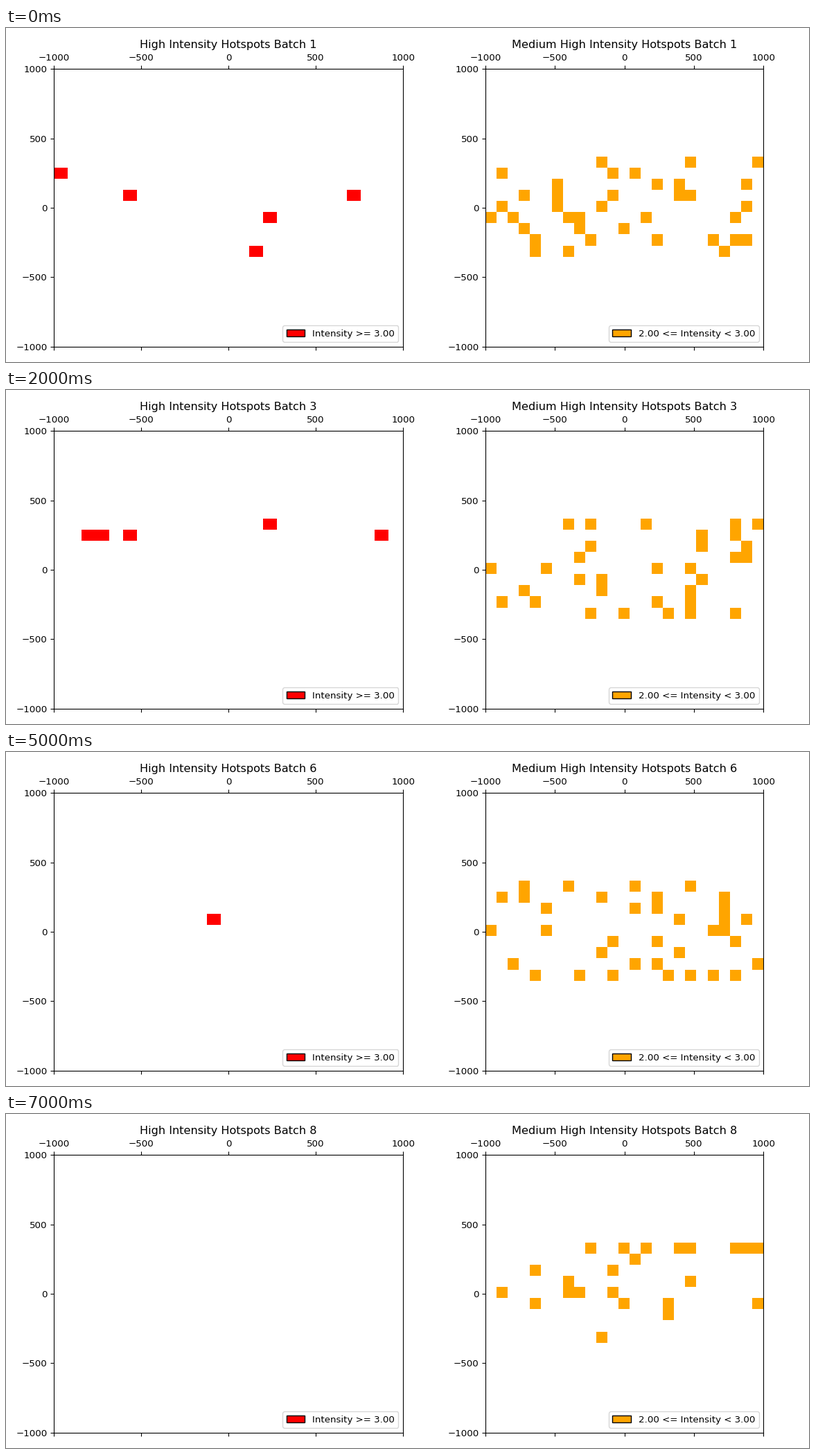
A matplotlib script that plays this animation: 1159x483 px, repeating every 8000 ms.

```python
import random

import matplotlib.pyplot as plt
from matplotlib.animation import FuncAnimation
from matplotlib.patches import Patch, Rectangle
from matplotlib.transforms import IdentityTransform

W, H, DPI = 1159, 483, 100
TOP, BOTTOM = 59.3, 460.8
GRID_TOP, ROW_H = 58.05, 16.06   # cell grid, in pixels from the top
TICKS = range(-1000, 1001, 500)

plt.rcParams.update({
    "font.size": 9.66,
    "axes.titlepad": 5.8,
    "xtick.major.pad": 3.38, "xtick.major.size": 3.38,
    "ytick.major.pad": 3.38, "ytick.major.size": 3.38,
})

# The few strongest cells of each batch, as (row, column).
HIGH = [
    [(9, 0), (11, 5), (11, 21), (13, 15), (16, 14)],
    [(10, 7), (12, 17), (14, 11), (14, 20)],
    [(8, 15), (9, 2), (9, 3), (9, 5), (9, 23)],
    [(10, 12), (13, 10), (14, 21)],
    [(8, 15), (13, 24), (14, 12)],
    [(11, 11)],
    [(12, 11), (14, 18)],
    [],
]
MEDIUM_COUNT = [37, 34, 32, 40, 29, 36, 29, 23]
BAND = [(row, col) for row in range(8, 17) for col in range(25)]


def medium_cells(i):
    """Scatter weaker cells over the middle band, clear of the strong ones."""
    free = [cell for cell in BAND if cell not in HIGH[i]]
    return random.Random(i).sample(free, MEDIUM_COUNT[i])


class Panel:
    def __init__(self, fig, name, color, label, left, width, grid_left, col_w):
        self.name, self.color = name, color
        self.grid_left, self.col_w = grid_left, col_w
        self.cells = []
        self.ax = fig.add_axes([left / W, 1 - BOTTOM / H,
                                width / W, (BOTTOM - TOP) / H])
        self.ax.set(xlim=(-1000, 1000), ylim=(-1000, 1000),
                    xticks=TICKS, yticks=TICKS)
        self.ax.tick_params(axis="x", top=True, bottom=True,
                            labeltop=True, labelbottom=False)
        self.ax.legend(handles=[Patch(facecolor=color, edgecolor="black",
                                      label=label)], loc="lower right")

    def add_cell(self, row, col):
        x0, x1 = (int(self.grid_left + self.col_w * c) for c in (col, col + 1))
        y0, y1 = (int(GRID_TOP + ROW_H * r) for r in (row, row + 1))
        cell = Rectangle((x0, H - y1), x1 - x0, y1 - y0, facecolor=self.color,
                         linewidth=0, antialiased=False,
                         transform=IdentityTransform())
        self.cells.append(self.ax.add_patch(cell))

    def show(self, number, spots):
        for cell in self.cells:
            cell.remove()
        self.cells.clear()
        for row, col in spots:
            self.add_cell(row, col)
        self.ax.set_title(f"{self.name} Intensity Hotspots Batch {number}")


fig = plt.figure(figsize=(W / DPI, H / DPI), dpi=DPI, facecolor="white")
high = Panel(fig, "High", "red", "Intensity >= 3.00",
             69.1, 504, 68.9, 20.16)
medium = Panel(fig, "Medium High", "orange", "2.00 <= Intensity < 3.00",
               691.9, 401.4, 692.2, 16.04)


def update(i):
    high.show(i + 1, HIGH[i])
    medium.show(i + 1, medium_cells(i))
    return []


anim = FuncAnimation(fig, update, frames=len(HIGH), interval=1000,
                     repeat=True, repeat_delay=0, blit=False)
plt.show()
```
